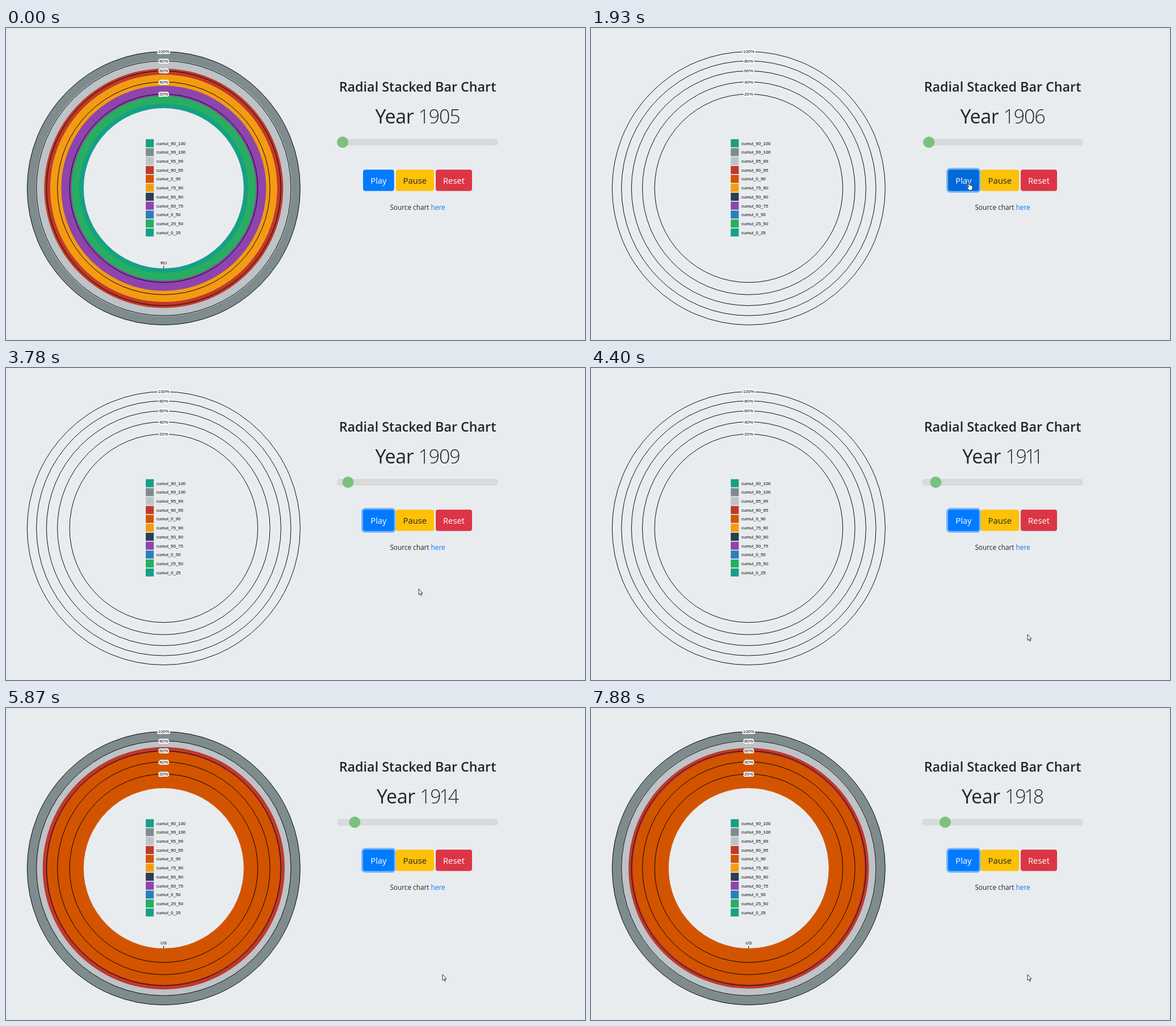
Animation, 1020 px wide and 549 px high, one loop 8 s. Source, as an HTML page:

```html
<!DOCTYPE html>
<html lang="en">
<head>
<meta charset="utf-8">
<title>Radial Stacked Bar Chart</title>
<style>
  html, body { margin: 0; width: 100%; height: 100%; overflow: hidden; background: #e9ecef; }
  svg { display: block; width: 100%; height: 100%; }
  text { fill: #212529; font-family: "Open Sans", "Noto Sans", sans-serif; }
  .chart text { fill: #000; font: 7.85px "Liberation Sans", Arial, sans-serif; }
  .grid circle { fill: none; stroke: #000; stroke-width: .95; }
  .grid text { stroke: #fff; stroke-width: 3.9px; stroke-linejoin: round; paint-order: stroke; }
  .mid, .grid text { text-anchor: middle; }
  .title { font-size: 23.3px; font-weight: 600; }
  .year { font-size: 34px; letter-spacing: -.4px; }
  .year tspan { font-weight: 300; letter-spacing: -1.2px; }
  .btn { font-size: 14.8px; }
  .light { fill: #fff; }
  .note { font-size: 11.8px; }
  .note tspan { fill: #007bff; }
</style>
</head>
<body>
<svg viewBox="0 0 1020 549" xmlns="http://www.w3.org/2000/svg">
  <rect width="1020" height="549" fill="#e9ecef"/>
  <g class="chart">
    <g id="rings"></g>
    <g id="country">
      <path d="M277.8 418.6V423" stroke="#000"/>
      <text id="code" class="mid" x="277.8" y="415.9"></text>
    </g>
    <g id="grid" class="grid"></g>
    <g id="legend"></g>
  </g>

  <text class="title mid" x="725" y="112">Radial Stacked Bar Chart</text>
  <text class="year mid" x="725" y="167.5">Year <tspan id="year"></tspan></text>

  <g opacity=".7">
    <rect x="583" y="195" width="284" height="12" rx="5" fill="#d3d3d3"/>
    <circle id="thumb" cy="201" r="10" fill="#4caf50"/>
  </g>

  <rect id="focus" x="626" y="246.3" width="60.7" height="43.4" rx="6.5" fill="#74b3f7"/>
  <rect id="play" x="629" y="249.3" width="54.7" height="37.4" rx="4"/>
  <rect x="686.7" y="249.3" width="67.3" height="37.4" rx="4" fill="#ffc107"/>
  <rect x="757" y="249.3" width="64" height="37.4" rx="4" fill="#dc3545"/>
  <text class="btn light mid" x="656.4" y="274">Play</text>
  <text class="btn mid" x="720.3" y="274">Pause</text>
  <text class="btn light mid" x="789" y="274">Reset</text>
  <text class="note mid" x="725" y="320">Source chart <tspan>here</tspan></text>

  <path id="arrow" d="M0 0V10.2L2.4 8.1 4 11.9 5.6 11.2 4 7.5H7Z" fill="#fff" stroke="#000" stroke-width=".8"/>
  <path id="hand" fill="#fff" stroke="#000" stroke-width=".7" stroke-linejoin="round"
    d="M-1 .8Q0-.6 1 .8V5Q2.2 4.2 2.8 5.4 4 4.8 4.5 6 5.8 5.6 6 7V10.4L4.8 14H-.2L-3.2 9.6Q-3.8 7.8-2.2 8L-1 9.2Z"/>
</svg>

<script>
const $ = id => document.getElementById(id);
const LOOP = 8000, STEP = 77.25;
const CX = 277.8, CY = 282, INNER = 141, OUTER = 240.5;

const COLORS = {
  "90_100": "#16a085", "99_100": "#7f8c8d", "95_99": "#bdc3c7", "90_95": "#c0392b",
  "0_90": "#d35400", "75_90": "#f39c12", "50_90": "#2c3e50", "50_75": "#8e44ad",
  "0_50": "#2980b9", "25_50": "#27ae60", "0_25": "#16a085"
};

// Outer radius of each band, from the rim inwards.
const band = (code, keys, radii) => ({ code, keys, radii: [OUTER, ...radii] });
const RU = ["99_100", "95_99", "90_95", "75_90", "50_75", "25_50", "0_25"];
const US = ["99_100", "95_99", "90_95", "0_90"];
const DATA = {
  1905: band("RU", RU, [225.4, 210.5, 200, 180.5, 162.5, 149]),
  1914: band("US", US, [224.3, 213.2, 204.8]),
  1915: band("US", US, [225.1, 214, 205.6]),
  1916: band("US", US, [222.6, 211, 203.2]),
  1917: band("US", US, [222.6, 210.5, 202.8]),
  1918: band("US", US, [224.8, 211.7, 203.7])
};

// Moments when the year advances, starting from 1905.
const TICKS = [1930, 2390, 2930, 3390, 3930, 4400, 4860, 5410, 5870, 6330, 6870, 7330, 7880];

const disc = (r, fill) => `<circle cx="${CX}" cy="${CY}" r="${r}" fill="${fill}"/>`;

// Radial scale: equal shares cover equal areas.
const radius = p => Math.sqrt(INNER ** 2 + (OUTER ** 2 - INNER ** 2) * p);

$("grid").innerHTML = [.2, .4, .6, .8, 1].map(p => {
  const r = radius(p);
  return disc(r, "none") +
    `<text x="${CX}" y="${CY - r + 2.8}">${Math.round(p * 100)}%</text>`;
}).join("");

$("legend").innerHTML = Object.keys(COLORS).map((key, i) => {
  const y = 195.7 + 15.7 * i;
  return `<rect x="246.2" y="${y}" width="14.1" height="14.1" fill="${COLORS[key]}"/>` +
    `<text x="265" y="${y + 9.9}">cumul_${key}</text>`;
}).join("");

let shown;
function showYear(year) {
  if (year === shown) return;
  shown = year;
  const digits = String(year), data = DATA[year];
  const one = i => i > 1 && digits[i] === "1" ? 1 : 0;
  $("year").textContent = digits;
  $("year").setAttribute("dx", [0, 1, 2, 3].map(i => -2.5 * (one(i) + one(i - 1))).join(" "));
  $("thumb").setAttribute("cx", 593 + (year - 1905) * 264 / 111);
  $("country").style.display = data ? "" : "none";
  $("code").textContent = data ? data.code : "";
  $("rings").innerHTML = data
    ? data.keys.map((key, i) => disc(data.radii[i], COLORS[key])).join("") + disc(INNER, "#e9ecef")
    : "";
}

const clamp = v => Math.min(1, Math.max(0, v));
const mix = (a, b, k) => a + (b - a) * k;

// Pointer position: comes in to the button, rests, then leaves.
function pointer(t) {
  const n = Math.floor((t + 6) / STEP);
  const inward = clamp((n - 4) / 9), out = clamp((n - 40) / 16);
  if (n < 41) {
    const k = 1 - (1 - inward) ** 1.6;
    return [mix(851, 666, k), mix(473, 271.5, k)];
  }
  const k = out * out * (3 - 2 * out);
  return [mix(666, 769, k), mix(271.5, 469, k)];
}

function draw(t) {
  showYear(1905 + TICKS.filter(m => t >= m).length);

  const [x, y] = pointer(t), visible = t >= 310;
  const over = visible && x > 629 && x < 684 && y > 249 && y < 287;
  const pressed = t >= 1230 && t < 1930;
  $("play").setAttribute("fill", pressed ? "#0062cc" : over ? "#0069d9" : "#007bff");
  $("focus").setAttribute("opacity", clamp((t - 1150) / 230));
  $("focus").style.display = t >= 1230 ? "" : "none";
  for (const [id, on] of [["arrow", !over], ["hand", over]]) {
    $(id).style.display = visible && on ? "" : "none";
    $(id).setAttribute("transform", `translate(${x} ${y})`);
  }
}

function frame() {
  draw(performance.now() % LOOP);
  requestAnimationFrame(frame);
}
frame();
</script>
</body>
</html>
```
